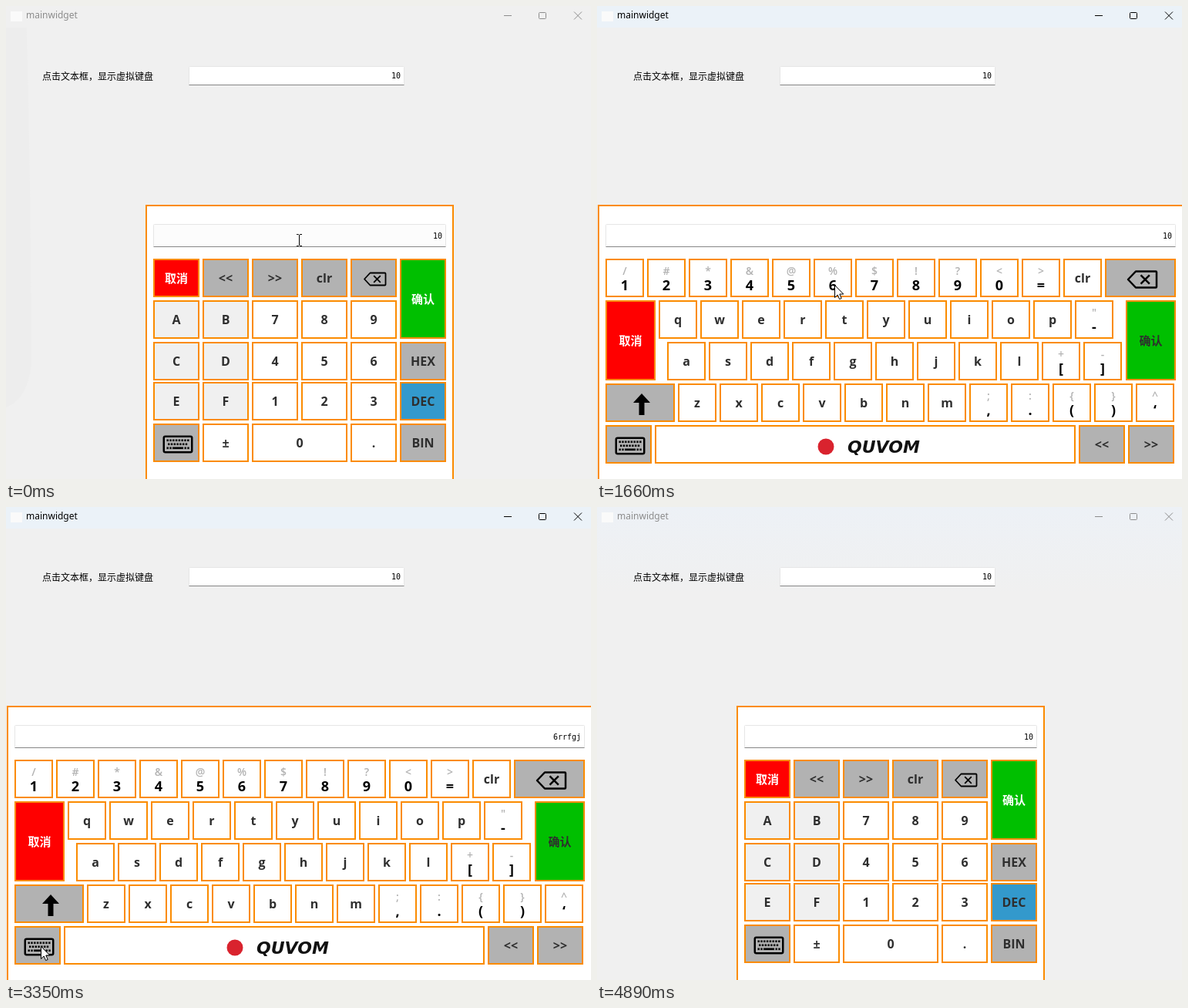
Recreate the animation shown at these times as an HTML page. Size 759 px wide and 614 px high, loop 4990 ms.

```html
<!DOCTYPE html>
<html lang="zh-CN">
<head>
<meta charset="utf-8">
<title>mainwidget</title>
<style>
  html, body { margin: 0; width: 100%; height: 100%; overflow: hidden; background: #f0f0f0; }
  svg { display: block; width: 759px; height: 614px; }
  text { white-space: pre; }
  .title { font: 12px "Noto Sans", "Open Sans", sans-serif; }
  .label { font: 12px "Noto Sans CJK SC", "Noto Sans CJK", sans-serif; }
  .value { font: 10px "DejaVu Sans Mono", monospace; text-anchor: end; }
  .key { font: 700 16px "Open Sans", "Noto Sans", sans-serif; text-anchor: middle; fill: #2e2e2e; }
  .cjk { font: 700 15px "Noto Sans CJK SC", "Noto Sans CJK", sans-serif; fill: #fff; }
  .main { font-size: 18px; fill: #000; }
  .alt { font-size: 14px; font-weight: 600; fill: #b2b2b2; }
  .brand { font: italic 700 22px "DejaVu Sans", sans-serif; fill: #111; }
</style>
</head>
<body>
<svg id="stage" viewBox="0 0 759 614" xmlns="http://www.w3.org/2000/svg">
  <defs>
    <linearGradient id="fade" x2="0" y2="1">
      <stop offset="0" stop-color="#edf1f6"/>
      <stop offset="1" stop-color="#f0f0f0"/>
    </linearGradient>
  </defs>
</svg>
<script>
const LOOP = 4990;
const ORANGE = '#fb8b00', GREY = '#b2b2b2', RED = '#f00', GREEN = '#00bf00',
      BLUE = '#3399cc', OFF = '#f0f0f0', PRESSED = '#d9d9d9';
const stage = document.getElementById('stage');

function add(parent, tag, attrs = {}, text) {
  const node = document.createElementNS(stage.namespaceURI, tag);
  for (const k in attrs) node.setAttribute(k, attrs[k]);
  if (text !== undefined) node.textContent = text;
  parent.append(node);
  return node;
}
const show = (node, on) => { node.style.display = on ? '' : 'none'; };
const rect = (p, x, y, width, height, fill, more) =>
  add(p, 'rect', { x, y, width, height, fill, ...more });
const line = (p, d, w, more) =>
  add(p, 'path', { d, fill: 'none', stroke: '#000', 'stroke-width': w, ...more });

function panel(x, w) {
  const g = add(stage, 'g');
  rect(g, x + 1, 259, w - 2, 400, '#fff', { stroke: ORANGE, 'stroke-width': 2 });
  return g;
}

function key(p, label, x, y, w = 50, h = 50, fill = '#fff') {
  const box = rect(p, x + 1, y + 1, w - 2, h - 2, fill, { stroke: ORANGE, 'stroke-width': 2 });
  const cx = x + w / 2;
  let text;
  if (label.length === 2 && label[0] === '|') label = label[1];
  else if (label.length === 2 && label[0] !== label[1] && label.charCodeAt(0) < 256) {
    add(p, 'text', { class: 'key alt', x: cx, y: y + 21 }, label[0]);
    add(p, 'text', { class: 'key main', x: cx, y: y + 41 }, label[1]);
    return { box };
  }
  const cjk = label.charCodeAt(0) > 0x4e00;
  text = add(p, 'text', { class: cjk ? 'key cjk' : 'key', x: cx, y: y + h / 2 + 6 }, label);
  return { box, text };
}

function keyboardIcon(p, x, y) {
  rect(p, x + 1.25, y + 1.25, 36.5, 20.5, 'none', { rx: 2, stroke: '#000', 'stroke-width': 2.5 });
  for (let i = 0; i < 8; i++) {
    rect(p, x + 5 + i * 3.8, y + 5, 2.4, 2.6, '#000');
    if (i < 7) rect(p, x + 6.5 + i * 3.8, y + 10, 2.4, 2.6, '#000');
  }
  for (const dx of [5, 8.8, 28, 31.8]) rect(p, x + dx, y + 15, 2.4, 2.6, '#000');
  rect(p, x + 12.5, y + 15, 14, 2.6, '#000');
}

function backspaceIcon(p, x, y, w, h, s) {
  const m = y + h / 2, c = x + w * 0.6, r = h * 0.27, n = x + w * 0.27;
  line(p, `M${x} ${m}L${n} ${y}H${x + w - 1}q1 0 1 1V${y + h - 1}q0 1 -1 1H${n}Z` +
    `M${c - r} ${m - r}l${2 * r} ${2 * r}M${c + r} ${m - r}l${-2 * r} ${2 * r}`, s,
    { 'stroke-linejoin': 'round' });
}

// Line edit with a value, a selection and a caret
function field(p, x, y, w, h, end) {
  const back = rect(p, x + .5, y + .5, w - 1, h - 1, '#fff', { stroke: '#e6e6e6', rx: 1 });
  const under = rect(p, x + .5, y + h - 1, w - 1, 1, '#868686');
  const top = y + Math.floor(h / 2) - 6;
  const mark = rect(p, end - 12, top, 12, 12, '#0078d7');
  const value = add(p, 'text', { class: 'value', x: end, y: top + 10 }, '10');
  const caret = rect(p, end, top, 1, 12, '#000');
  return {
    back,
    set(text, focus, selected, blink) {
      value.textContent = text;
      value.setAttribute('fill', selected ? '#fff' : '#000');
      under.setAttribute('fill', focus ? '#0067c0' : '#868686');
      under.setAttribute('y', y + h - (focus ? 2 : 1));
      under.setAttribute('height', focus ? 2 : 1);
      show(mark, selected);
      show(caret, blink);
    }
  };
}

// Window frame
const ghost = add(stage, 'path', { d: 'M0 28H27Q33 280 33 465Q28 510 0 521Z', fill: '#ededed' });
const bar = rect(stage, 0, 0, 759, 28, '#ebf2f8');
const haze = rect(stage, 0, 0, 759, 110, 'url(#fade)');
rect(stage, 6, 7, 15, 13, '#fafafa');
const title = add(stage, 'text', { class: 'title', x: 26, y: 16 }, 'mainwidget');
const buttons = line(stage, 'M646 12.5H656M737 7.5L747 17.5M747 7.5L737 17.5' +
  'M692.5 8.5h7q1 0 1 1v6q0 1 -1 1h-7q-1 0 -1 -1v-6q0 -1 1 -1Z', 1);
add(stage, 'text', { class: 'label', x: 47, y: 95.5 }, '点击文本框，显示虚拟键盘');
const topField = field(stage, 237, 78, 280, 25, 512);
topField.back.setAttribute('height', 24);

// Number pad
const pad = panel(181, 400);
const padField = field(pad, 191, 283, 380, 30, 566);
const padRow = (y, labels, fills) => labels.forEach((s, i) =>
  s && key(pad, s, 191 + 64 * i, y, 60, 50, fills[i]));
padRow(328, ['取消', '<<', '>>', 'clr', ' '], [RED, GREY, GREY, GREY, GREY]);
key(pad, '确认', 511, 328, 60, 104, GREEN);
padRow(382, ['A', 'B', '7', '8', '9'], [OFF, OFF]);
padRow(436, ['C', 'D', '4', '5', '6', 'HEX'], [OFF, OFF, , , , GREY]);
padRow(488, ['E', 'F', '1', '2', '3', 'DEC'], [OFF, OFF, , , , BLUE]);
padRow(542, [' ', '±', '', '', '.', 'BIN'], [GREY, , , , , GREY]);
key(pad, '0', 319, 542, 124);
backspaceIcon(pad, 465, 346.5, 27.5, 16, 1.8);
keyboardIcon(pad, 203.5, 557.5);

// Full keyboard
const board = panel(1, 761);
const boardField = field(board, 11, 283, 740, 30, 746);
const keys = {};
const boardRow = (x, y, labels) => labels.split(' ').forEach((s, i) => {
  keys[s] = key(board, s, x + 54 * i, y);
});
boardRow(11, 328, '/1 #2 *3 &4 @5 %6 $7 !8 ?9 <0 >= clr');
boardRow(80, 382, 'q w e r t y u i o p "-');
boardRow(91, 436, 'a s d f g h j k l +[ -]');
boardRow(105, 490, "z x c v b n m ;, :. {( }) ^‘");
key(board, ' ', 659, 328, 92, 50, GREY);
key(board, '取消', 11, 382, 65, 104, RED);
const confirm = key(board, '确认', 686, 382, 65, 104, GREEN);
key(board, ' ', 11, 490, 90, 50, GREY);
key(board, ' ', 11, 544, 60, 50, GREY);
key(board, ' ', 75, 544, 546);
key(board, '<<', 625, 544, 60, 50, GREY);
key(board, '>>', 689, 544, 60, 50, GREY);
backspaceIcon(board, 689, 344.5, 37, 21, 2.5);
keyboardIcon(board, 23.5, 559.5);
add(board, 'path', { d: 'M58 503L69 515H61.5V531H54.5V515H47Z' });
add(board, 'circle', { cx: 297, cy: 572, r: 10.5, fill: '#d9232e' });
add(board, 'text', { class: 'brand', x: 325, y: 580 }, 'QUVOM');

// Pointers
const beam = line(stage, 'M377 296.5h2.5l1 1l1 -1H384M380.5 297V311M377 311.5h2.5l1 -1l1 1H384', 1);
const arrow = add(stage, 'path', {
  d: 'M.5 .5V16.5L4.2 13L6.6 18.6L9.2 17.5L6.8 12H11.8Z',
  fill: '#fff', stroke: '#000', 'stroke-width': 1, 'stroke-linejoin': 'round'
});

// [time, x, y] of the arrow
const moves = [
  [150, 379, 321], [300, 345, 410], [420, 300, 504], [570, 253, 554], [720, 230, 564],
  [840, 221, 567], [1410, 245, 528], [1540, 290, 430], [1660, 308, 362], [1800, 303, 372],
  [1930, 287, 422], [2070, 276, 422], [2200, 268, 428], [2350, 261, 436], [2500, 268, 452],
  [2620, 318, 460], [2770, 326, 462], [2920, 430, 462], [3040, 78, 538], [3200, 49, 562],
  [3350, 45, 570], [3770, 250, 563], [3890, 460, 553], [4040, 721, 598], [4170, 721, 640]
];
const typing = [
  [0, '10'], [1800, '6'], [2070, '6r'], [2350, '6rr'], [2500, '6rrf'],
  [2770, '6rrfg'], [2920, '6rrfgj']
];
const at = (list, t) => list.findLast(s => s[0] <= t);
const within = (t, a, b) => t >= a && t < b;

function draw(t) {
  const active = within(t, 990, 4890), full = within(t, 1120, 3500);
  const ink = active ? '#000' : '#8c8c8c';
  title.setAttribute('fill', ink);
  buttons.setAttribute('stroke', ink);
  show(ghost, t < 990);
  show(bar, within(t, 1410, 4890));
  show(haze, t >= 4890);
  show(pad, !full);
  show(board, full);

  const topFocus = within(t, 3500, 4890);
  topField.set('10', topFocus, topFocus, topFocus && !within(t, 4040, 4600));
  padField.set('10', false, false, false);
  padField.back.setAttribute('fill', t < 150 ? '#fcfcfc' : '#fff');
  const editing = within(t, 1120, 1660);
  boardField.set(at(typing, t)[1], editing, editing, editing);
  confirm.text.style.fill = editing ? '#fff' : '#2e2e2e';
  keys.r.box.setAttribute('fill', within(t, 2200, 2350) ? PRESSED : '#fff');
  keys.g.box.setAttribute('fill', within(t, 2620, 2770) ? PRESSED : '#fff');

  const pos = at(moves, t);
  show(beam, !pos);
  show(arrow, pos);
  if (pos) arrow.setAttribute('transform', `translate(${pos[1]} ${pos[2]})`);
}

const start = performance.now();
function tick(now) {
  draw(Math.max(0, now - start) % LOOP);
  requestAnimationFrame(tick);
}
draw(0);
requestAnimationFrame(tick);
</script>
</body>
</html>
```
